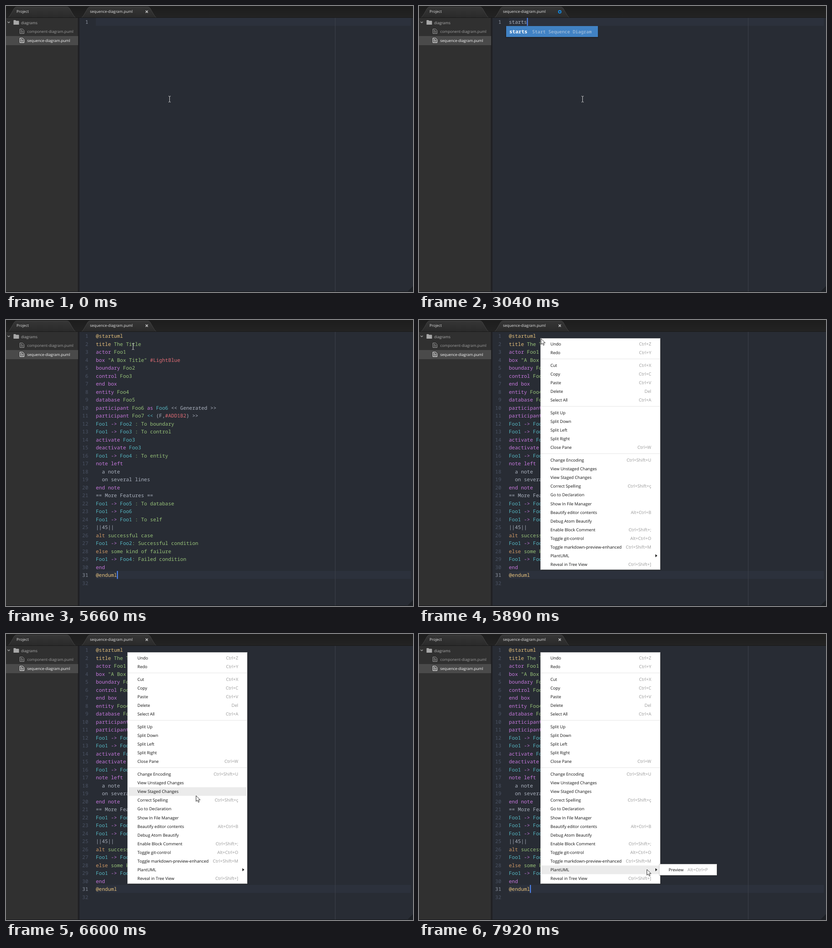
Write an HTML page that moves like this. It is 892 px wide and 628 px high and loops after 8000 ms.

```html
<!DOCTYPE html>
<html lang="en">
<head>
<meta charset="utf-8">
<title>Sequence diagram editing</title>
<style>
  html, body { margin: 0; width: 100%; height: 100%; overflow: hidden; background: #282c34; }
  svg { display: block; text-rendering: geometricPrecision; }
  text { white-space: pre; }
  .ui { font: 8.3px "Open Sans", "Noto Sans", sans-serif; }
  .code { font: 11px "Noto Sans Mono", "DejaVu Sans Mono", monospace; fill: #abb2bf; }
  .num { fill: #4b5364; text-anchor: end; }
  .num.now { fill: #8f96a3; }
  .p { fill: #c678dd; } .g { fill: #98c379; } .c { fill: #56b6c2; } .r { fill: #e06c75; }
  .y { fill: #e5c07b; } .o { fill: #d19a66; }
  .word { fill: #b9bbbd; }
  .match { fill: #fff; font-weight: 700; }
  .hint { font-size: 9.9px; fill: #56595c; }
  .chosen .word { fill: #e3edf7; } .chosen .hint { fill: #b7cbe0; }
  .menu { font: 9.13px "Open Sans", "Noto Sans", sans-serif; fill: #111; }
  .key { font-size: 9.6px; fill: #999; text-anchor: end; }
  .key.on { fill: #111; }
</style>
</head>
<body>
<svg width="892" height="628" viewBox="0 0 892 628">
  <defs>
    <linearGradient id="tab" x2="0" y2="1"><stop stop-color="#363636"/><stop offset="1" stop-color="#2a2a2a"/></linearGradient>
    <linearGradient id="bar" x2="0" y2="1"><stop stop-color="#1d1d1d"/><stop offset="1" stop-color="#232323"/></linearGradient>
    <g id="file" fill="none" stroke="currentColor">
      <path d="M.5 .5h6l3 3v7h-9z"/><path d="M2.5 3.5h3M2.5 5.5h5M2.5 8h5"/>
    </g>
  </defs>

  <rect width="892" height="628" fill="#282c34"/>
  <rect id="lineGlow" x="197" width="690" height="17.5" fill="#2c313c"/>
  <path d="M721.5 26V627" stroke="#3c414a"/>
  <g id="code" class="code"></g>
  <rect id="caret" width="2" height="17.5" fill="#528bff"/>

  <rect y="26" width="158" height="602" fill="#303030"/>
  <rect x="157.5" y="26" width="3.5" height="602" fill="#1f2023"/>
  <rect y="66" width="158" height="20" fill="#4a4a4a"/>
  <rect width="892" height="26" fill="url(#bar)"/>
  <rect y="25" width="892" height="1" fill="#191919"/>
  <g fill="url(#tab)" stroke="#4a4a4a" stroke-width=".8">
    <path d="M5 25Q8 23 10 19L18 5Q20 2 23 2H134Q137 2 139 5L147 19Q149 23 152 25"/>
    <path d="M166 25Q169 23 171 19L179 5Q181 2 184 2H311Q314 2 316 5L324 19Q326 23 329 25"/>
  </g>
  <g class="ui">
    <text x="23" y="15" fill="#e2e2e2">Project</text>
    <text x="184" y="15" fill="#e8e8e8">sequence-diagram.puml</text>
    <text x="33" y="39.6" fill="#b3b3b3">diagrams</text>
    <text x="46.5" y="59.3" fill="#a0a0a0">component-diagram.puml</text>
    <text x="46.5" y="79.3" fill="#fff">sequence-diagram.puml</text>
  </g>
  <path d="M3.5 34.5L6 37L8.5 34.5" fill="none" stroke="#aaa" stroke-width="1.2"/>
  <path d="M16.5 41V32Q16.5 31 17.5 31H21L22 32.5H27.5Q28.5 32.5 28.5 33.5V41Z" fill="#a8a8a8"/>
  <use href="#file" x="30" y="50" color="#a0a0a0"/>
  <use href="#file" x="30" y="70" color="#fff"/>
  <path id="close" d="M306 10L311 15M311 10L306 15" stroke="#c4c4c4" stroke-width="1.7"/>
  <circle id="dirty" cx="308.5" cy="12.8" r="2.8" fill="none" stroke="#108cea" stroke-width="1.8"/>
  <path d="M0 627.5H892" stroke="#15171a"/>
  <path d="M892 615V628H879Z" fill="#1d2025"/>

  <g id="popup" class="code"></g>
  <g id="menu" class="menu"></g>
  <g id="submenu" class="menu">
    <rect x="527" y="506" width="127" height="25" fill="#000" opacity=".3"/>
    <rect x="526.5" y="505.5" width="126" height="24" fill="#fff" stroke="#ccc"/>
    <text x="547" y="521.2">Preview</text>
    <text class="key" x="633" y="521.2">Alt+Ctrl+P</text>
  </g>
  <path id="beam" d="M-2.5 -6.5H-1L0 -5.5L1 -6.5H2.5M0 -5.5V5.5M-2.5 6.5H-1L0 5.5L1 6.5H2.5" fill="none" stroke="#d4d4d4"/>
  <path id="arrow" d="M0 0V12.6L2.9 9.9L5 14.6L7.1 13.7L5.1 9.2H9.1Z" fill="#fff" stroke="#111" stroke-width=".9"/>
</svg>

<script>
const LOOP = 8000, LINE = 17.5, CHAR = 6.6, LEFT = 197;
const $ = id => document.getElementById(id);
const show = (id, on) => { $(id).style.display = on ? '' : 'none'; };
const place = (id, x, y) => $(id).setAttribute('transform', `translate(${x} ${y})`);
const escapeText = s => s.replace(/&/g, '&amp;').replace(/</g, '&lt;').replace(/>/g, '&gt;');

// "§" plus a letter starts a run in that colour; n is plain.
const source = `§y@startuml
§ytitle §gThe Title
§pactor §gFoo1
§pbox §g"A Box Title" §r#LightBlue
§pboundary §gFoo2
§pcontrol §gFoo3
§pend box
§pentity §gFoo4
§pdatabase §gFoo5
§pparticipant §gFoo6 §pas §cFoo6 §n<< Generated >>
§pparticipant §gFoo7 §c<< §n(F,§r#ADD1B2§n) >>
§cFoo1 §p-> §cFoo2 §g: To boundary
§cFoo1 §p-> §cFoo3 §g: To control
§pactivate §cFoo3
§pdeactivate §cFoo3
§cFoo1 §p-> §cFoo4 §g: To entity
§pnote left
§n  a note
§n  on several lines
§pend note
§n== More Features ==
§cFoo1 §p-> §cFoo5 §g: To database
§cFoo1 §p-> §cFoo6
§cFoo1 §p-> §cFoo1 §g: To self
§n||45||
§oalt §gsuccessful case
§cFoo1 §p-> §cFoo2§g: Successful condition
§oelse §gsome kind of failure
§cFoo1 §p-> §cFoo4§g: Failed condition
§pend
§y@enduml`.split('\n');

const snippets = [
  ['start', 'Start Uml'], ['starta', 'Start Activity Diagram'], ['startc', 'Start Component Diagram'],
  ['starts', 'Start Sequence Diagram'], ['startt', 'Start State Diagram'],
  ['startu', 'Start Use Case Diagram'], ['startz', 'Start Class Diagram']
];

const menuGroups = [
  'Undo|Ctrl+Z,Redo|Ctrl+Y',
  'Cut|Ctrl+X,Copy|Ctrl+C,Paste|Ctrl+V,Delete|Del,Select All|Ctrl+A',
  'Split Up,Split Down,Split Left,Split Right,Close Pane|Ctrl+W',
  'Change Encoding|Ctrl+Shift+U,View Unstaged Changes,View Staged Changes,' +
  'Correct Spelling|Ctrl+Shift+ç,Go to Declaration,Show In File Manager,' +
  'Beautify editor contents|Alt+Ctrl+B,Debug Atom Beautify,Enable Block Comment|Ctrl+Shift+;,' +
  'Toggle git-control|Alt+Ctrl+O,Toggle markdown-preview-enhanced|Ctrl+Shift+M,PlantUML,' +
  'Reveal in Tree View|Ctrl+Shift+]'
];

const typed = 'starts';
const typeTimes = [690, 1160, 1620, 2170, 2490, 3040];
const matchTimes = [690, 1160, 1710, 2170, 2570, 3040];
const caretFlips = [70, 460, 690, 990, 1160, 1470, 1620, 1940, 2170, 2870, 3040, 3340, 3650, 3960,
  4340, 4890, 5285, 5680, 6060, 6440, 6900, 7380, 7840];
const EXPAND = 3650, DIRTY = 990, SAVE = 4590;

// The pointer moves in discrete ticks: [tick, x, y].
const MOVE_START = 5110, TICK = 77.75, MENU_TICK = 10, HOVER_TICK = 14, SUBMENU_TICK = 32;
const pointerPath = [[-1, 358.5, 204.5], [2, 335, 165], [6, 284, 68], [9, 267, 40], [10, 267, 41],
  [13, 267, 41], [15, 303, 105], [17, 365, 252], [19, 416, 355], [21, 437, 415], [24, 456, 485],
  [27, 465, 505], [30, 472, 516], [32, 472, 516], [33, 497, 517], [35, 497, 517], [36, 499, 517]];

function pointerAt(tick) {
  const next = pointerPath.findIndex(p => p[0] >= tick);
  if (next === 0) return pointerPath[0].slice(1);
  if (next < 0) return pointerPath.at(-1).slice(1);
  const [t0, x0, y0] = pointerPath[next - 1], [t1, x1, y1] = pointerPath[next];
  const k = (tick - t0) / (t1 - t0);
  return [x0 + (x1 - x0) * k, y0 + (y1 - y0) * k];
}

const passed = (times, t) => times.filter(time => time <= t).length;
const baseline = row => 39 + row * LINE;
const lineNumber = (row, now) =>
  `<text class="num ${now ? 'now' : ''}" x="180.3" y="${baseline(row)}">${row + 1}</text>`;

function codeLine(line, row) {
  const runs = line.split('§').slice(1)
    .map(run => `<tspan class="${run[0]}">${escapeText(run.slice(1))}</tspan>`).join('');
  return `<text x="${LEFT}" y="${baseline(row)}">${runs}</text>`;
}

function codeMarkup(expanded, saved, length) {
  const lines = expanded ? source : ['§n' + typed.slice(0, length)];
  const last = lines.length - 1;
  return lines.map((line, i) => lineNumber(i, i === last) + codeLine(line, i)).join('') +
    (saved ? lineNumber(lines.length, false) : '');
}

function popupMarkup(length) {
  if (!length) return '';
  const rowHeight = 23.83;
  const items = snippets.filter(([word]) => length < 6 || word === typed);
  const width = Math.max(...items.map(([, hint]) => hint.length)) * 5.94 + 70.5;
  const height = items.length * rowHeight;
  const rows = items.map(([word, hint], i) => {
    const y = 60 + i * rowHeight;
    return `<g class="${i ? '' : 'chosen'}"><text class="word" x="198" y="${y}"><tspan class="match">` +
      `${word.slice(0, length)}</tspan>${word.slice(length)}</text>` +
      `<text class="hint" x="248" y="${y - .5}">${hint}</text></g>`;
  }).join('');
  return `<rect x="189.5" y="44" width="${width + 3}" height="${height + 2.5}" rx="2" fill="#000" opacity=".2"/>` +
    `<rect x="191" y="44" width="${width}" height="${height}" fill="#1f2123"/>` +
    `<rect x="191" y="44" width="${width}" height="24" fill="#4182c4"/>` + rows;
}

const menuRows = [], dividers = [];
menuGroups.forEach((group, g) => group.split(',').forEach((item, i) => {
  const [label, key = ''] = item.split('|');
  const y = 53 + menuRows.length * 19.1 + g * 8.5;
  if (g && !i) dividers.push(Math.round(y - 14.5) + .5);
  menuRows.push({ label, key, y });
}));

function menuMarkup(hover) {
  const rows = menuRows.map(({ label, key, y }, i) => {
    const on = i === hover;
    return (on ? `<rect x="268" y="${y - 9.5}" width="259" height="19" fill="#ebebeb"/>` : '') +
      `<text x="288" y="${y + 3.3}">${label}</text>` +
      `<text class="key ${on ? 'on' : ''}" x="509" y="${y + 3.3}">${key}</text>`;
  }).join('');
  return '<rect x="268" y="42" width="262" height="508" fill="#000" opacity=".3"/>' +
    '<rect x="266.5" y="40.5" width="262" height="507.5" fill="#fff" stroke="#ccc"/>' +
    dividers.map(y => `<path d="M267 ${y}H528" stroke="#e6e6e6"/>`).join('') + rows +
    '<path d="M518 514.3V520.9L522.3 517.6Z" fill="#222"/>';
}

const drawn = {};
function redraw(id, key, markup) {
  if (drawn[id] === key) return;
  drawn[id] = key;
  $(id).innerHTML = markup();
}

function render(t) {
  const expanded = t >= EXPAND, saved = t >= SAVE;
  const length = passed(typeTimes, t);
  const match = expanded ? 0 : passed(matchTimes, t);
  const row = expanded ? source.length - 1 : 0;
  const lineTop = 26 + row * LINE;

  redraw('code', `${expanded} ${saved} ${length}`, () => codeMarkup(expanded, saved, length));
  redraw('popup', match, () => popupMarkup(match));
  $('lineGlow').setAttribute('y', lineTop);
  place('caret', LEFT + (expanded ? 7 : length) * CHAR, lineTop);
  show('caret', passed(caretFlips, t) % 2);

  const dirty = t >= DIRTY && !saved;
  show('dirty', dirty);
  show('close', !dirty);

  const tick = Math.max(-1, Math.floor((t - MOVE_START) / TICK));
  const [x, y] = pointerAt(tick);
  const menuOpen = tick >= MENU_TICK;
  const hover = tick < HOVER_TICK ? -1 : menuRows.findIndex(r => Math.abs(r.y - y) <= 9.55);
  redraw('menu', hover, () => menuMarkup(hover));
  show('menu', menuOpen);
  show('submenu', tick >= SUBMENU_TICK);

  const pointing = menuOpen || (match > 0 && match < 6);
  show('arrow', pointing);
  show('beam', !pointing);
  place('arrow', menuOpen ? x + .5 : x - .5, y);
  place('beam', Math.floor(x) + .5, Math.floor(y) + .5);
}

const start = performance.now();
function frame() {
  render((performance.now() - start) % LOOP);
  requestAnimationFrame(frame);
}
frame();
</script>
</body>
</html>
```
